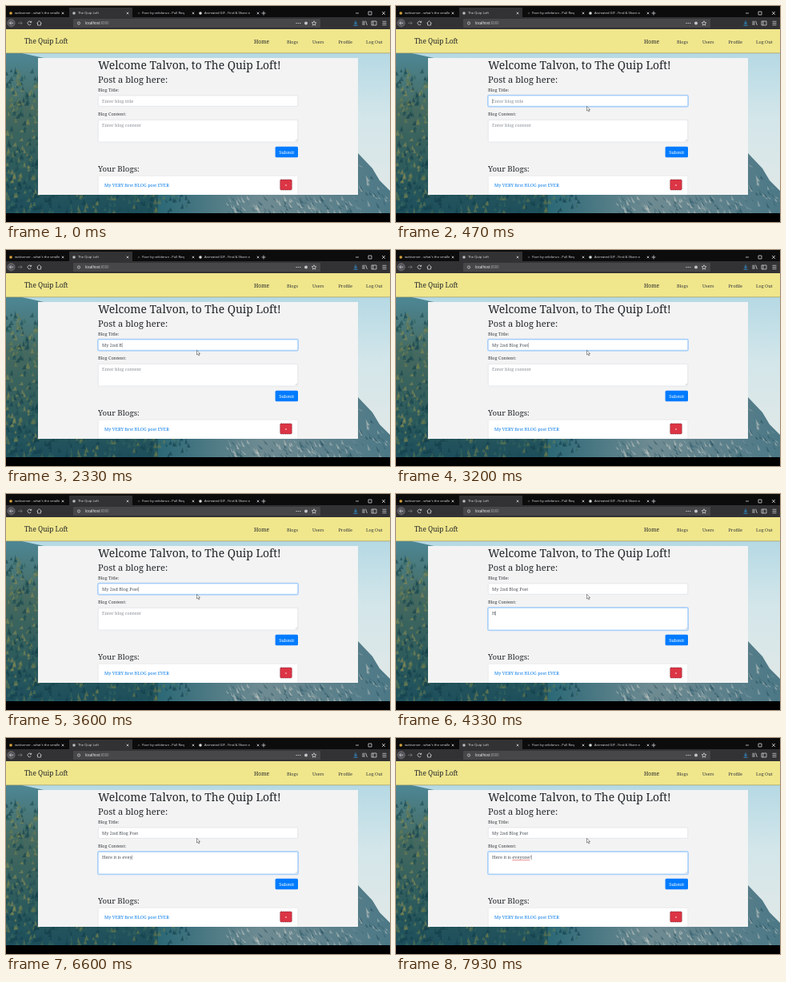
Recreate the animation shown at these times as an HTML page. Size 480 by 270 pixels, loop 8 s.

```html
<!DOCTYPE html>
<html lang="en">
<head>
<meta charset="utf-8">
<title>Blog form</title>
<style>
  html, body { margin: 0; width: 100%; height: 100%; overflow: hidden; background: #000; }
  svg { display: block; width: 100vw; height: 100vh; }
  text { font-family: "Noto Serif", serif; font-size: 5.55px; fill: #33383c; white-space: pre; }
  .chrome text { font-family: "Open Sans", sans-serif; font-size: 4.1px; fill: #e4e4e8; }
  .icon { fill: none; stroke: #d0d0d4; stroke-width: .8; }
  .heading { fill: #212529; }
  .value { fill: #495057; }
  .hint { fill: #868e95; }
  .caret { fill: #555; }
  .field { fill: #fff; stroke: #ced4da; stroke-width: .5; }
  .field.focus { stroke: #80bdff; stroke-width: .6; }
  .ring { fill: none; stroke: #007bff; stroke-opacity: .25; stroke-width: 1.3; }
</style>
</head>
<body>
<svg viewBox="0 0 480 270" preserveAspectRatio="none">
  <defs>
    <linearGradient id="sky" x1="0" y1="0" x2="0" y2="1">
      <stop offset="0" stop-color="#b5d9e4"/>
      <stop offset=".4" stop-color="#d3e6ea"/>
      <stop offset="1" stop-color="#e3e8e6"/>
    </linearGradient>
    <linearGradient id="forest" x1="0" y1="0" x2="0" y2="1">
      <stop offset="0" stop-color="#4d8795"/>
      <stop offset=".35" stop-color="#45695f"/>
      <stop offset=".75" stop-color="#2c5a5c"/>
      <stop offset="1" stop-color="#1d4f5c"/>
    </linearGradient>
    <linearGradient id="rock" x1="0" y1="0" x2="1" y2="0">
      <stop offset="0" stop-color="#2b6876"/>
      <stop offset=".45" stop-color="#6f8b92"/>
      <stop offset="1" stop-color="#4c7886"/>
    </linearGradient>
  </defs>

  <!-- mountain backdrop -->
  <rect y="59" width="480" height="200" fill="url(#sky)"/>
  <path d="M0 59H20L52 66L110 150L240 236L300 259H0Z" fill="url(#forest)"/>
  <path d="M190 259V236L400 170L440 184L458 203L467 218L480 231V259Z" fill="url(#rock)"/>
  <g id="trees"></g>
  <g id="crags"></g>

  <!-- browser window -->
  <g class="chrome">
    <rect width="480" height="15" fill="#0c0c0d"/>
    <rect y="14" width="480" height="15" fill="#323234"/>
    <rect x="79" y="2" width="79" height="13" fill="#323234"/>
    <circle cx="6" cy="9" r="1.800" fill="#d9a43b"/>
    <circle cx="85" cy="9" r="1.800" fill="#b9bcc0"/>
    <circle cx="166" cy="9" r="1.300" fill="#38383c"/>
    <circle cx="243" cy="9" r="1.800" fill="#d8dddb"/>
    <text x="11" y="10.300">webserver - what's the smalle</text>
    <text x="90" y="10.300">The Quip Loft</text>
    <text x="170" y="10.300">Fixer by velidorun - Pull Req</text>
    <text x="248" y="10.300">Animated GIF - Find &amp; Share o</text>
    <g id="closers" class="icon"></g>
    <path class="icon" d="M319.500 9H324.500M322 6.500V11.500M437 9H441M453 7H457V11H453ZM470 7L474 11M474 7L470 11"/>

    <rect x="84" y="16" width="309" height="11" rx="1" fill="#474749"/>
    <circle cx="6.500" cy="21.300" r="4.700" fill="#55555a" stroke="#85858a" stroke-width=".5"/>
    <path class="icon" d="M9 21.300H4.500M6.500 19.200L4.400 21.300L6.500 23.400"/>
    <path class="icon" d="M15 21.300H20M18 19.200L20.100 21.300L18 23.400" opacity=".45"/>
    <path class="icon" d="M31.300 20.200A2.300 2.300 0 1 0 31.300 22.600M31.700 18.700V20.500H29.800"/>
    <path class="icon" d="M38.500 21.500L41.500 18.700L44.500 21.500M39.500 21V24H43.500V21"/>
    <circle class="icon" cx="91" cy="21.500" r="1.600"/>
    <text x="99" y="23" style="fill:#fff;font-size:4.400px">localhost<tspan fill="#a5a5aa">:8080</tspan></text>
    <path d="M362.500 21.500H368.500" stroke="#d0d0d4" stroke-width="1.200" stroke-dasharray="1.200 1.100"/>
    <circle cx="375" cy="21.500" r="2" fill="#c5c5ca"/>
    <path class="icon" d="M385 18.700L385.800 20.600L387.900 20.800L386.300 22.100L386.800 24.200L385 23.100L383.200 24.200L383.700 22.100L382.100 20.800L384.200 20.600Z"/>
    <path class="icon" style="stroke:#32a2ee" d="M437 18.500V22.500M435.200 20.800L437 22.600L438.800 20.800M434.500 24.200H439.500"/>
    <path class="icon" d="M446 18.700V24M447.800 18.700V24M449.600 18.700L451.400 24M457 19H463V24H457ZM459 19V24M470.500 19.300H475.500M470.500 21.500H475.500M470.500 23.700H475.500"/>
  </g>

  <!-- navigation -->
  <rect y="29" width="480" height="30" fill="#f0e68c"/>
  <rect y="58.600" width="480" height=".6" fill="#8b8b67"/>
  <text class="heading" x="23" y="47" style="font-size:8.350px">The Quip Loft</text>
  <text class="heading" x="310" y="47" style="font-size:6.700px">Home</text>
  <text x="351" y="47">Blogs</text>
  <text x="383" y="47">Users</text>
  <text x="415.500" y="47">Profile</text>
  <text x="450" y="47">Log Out</text>

  <!-- page -->
  <rect x="40" y="65" width="400" height="171" fill="#f3f3f3"/>
  <text class="heading" x="115" y="79" style="font-size:13.900px">Welcome Talvon, to The Quip Loft!</text>
  <text class="heading" x="115" y="95.500" style="font-size:11.150px">Post a blog here:</text>
  <text x="115" y="107">Blog Title:</text>
  <text x="115" y="137.300">Blog Content:</text>

  <g id="title">
    <rect class="ring" x="114.600" y="111.300" width="250.800" height="14.700" rx="1.800"/>
    <rect class="field" x="115.250" y="112" width="249.500" height="13.300" rx="1.300"/>
    <text class="hint" x="120" y="121">Enter blog title</text>
    <text class="value" x="120" y="121"></text>
    <rect class="caret" y="116" width=".4" height="6"/>
  </g>
  <g id="content">
    <rect class="ring" x="114.600" y="141.700" width="250.800" height="29" rx="1.800"/>
    <rect class="field" x="115.250" y="142.400" width="249.500" height="27.600" rx="1.300"/>
    <path d="M361.500 169L364 166.500M363 169L364 168" stroke="#999" stroke-width=".4"/>
    <text class="hint" x="120" y="151.300">Enter blog content</text>
    <text class="value" x="120" y="151.300"></text>
    <rect class="caret" y="146.300" width=".4" height="6"/>
  </g>
  <path id="squiggle" fill="none" stroke="#e0303c" stroke-width=".6"/>

  <rect x="336.600" y="175.700" width="28.400" height="13.600" rx="1.500" fill="#007bff"/>
  <text x="350.800" y="184.600" text-anchor="middle" style="fill:#fff">Submit</text>
  <text class="heading" x="115" y="207" style="font-size:9.750px">Your Blogs:</text>
  <path d="M115.250 236V213.500Q115.250 212.200 116.500 212.200H363.500Q364.750 212.200 364.750 213.500V236" fill="#fff" stroke="#dedede" stroke-width=".5"/>
  <text x="123" y="226" style="fill:#0078e7">My VERY first BLOG post EVER</text>
  <rect x="342.700" y="217" width="14.600" height="13" rx="1.300" fill="#dc3545" stroke="#5d2028" stroke-width=".6" stroke-dasharray="1 .6"/>
  <text x="350" y="225" text-anchor="middle" style="fill:#fff;font-size:4px">x</text>
  <rect y="259" width="480" height="11" fill="#000"/>

  <path id="arrow" d="M238.500 125.300V131L239.900 129.800L240.900 132L241.900 131.500L240.900 129.500H242.600Z" fill="#fff" stroke="#222" stroke-width=".45"/>
  <path id="beam" d="M237.700 123.200H240.300M239 123.200V129M237.700 129H240.300" fill="none" stroke="#222" stroke-width=".6"/>
</svg>
<script>
const LOOP = 8000, BLINK = 530;
const $ = selector => document.querySelector(selector);
const show = (node, visible) => { node.style.display = visible ? '' : 'none'; };
const steps = (count, start, gap) => Array.from({ length: count }, (_, i) => start + i * gap);

$('#closers').innerHTML = [71, 152, 234, 315].map(x =>
  `<path d="M${x - 1.3} 7.700l2.600 2.600m0 -2.600l-2.600 2.600"/>`).join('');

let seed = 11;
const random = (low, high) => {
  seed = seed * 16807 % 2147483647;
  return low + (high - low) * seed / 2147483647;
};
const scatter = (count, colors, outline) => Array.from({ length: count }, () =>
  `<path fill="${colors[Math.floor(random(0, colors.length))]}" opacity=".6" d="${outline()}"/>`).join('');

const treeColors = ['#123d4a', '#1d4b54', '#35655f', '#6b7b4c', '#868a55'];
const tree = (x, y) => `M${x} ${y}l${random(1, 3)} ${random(4, 8)}h${-random(3, 6)}z`;
$('#trees').innerHTML =
  scatter(230, treeColors, () => tree(random(0, 42), random(76, 250))) +
  scatter(130, treeColors.slice(0, 4), () => tree(random(0, 230), random(230, 255)));

// Crags lean along the ridge that falls to the right.
$('#crags').innerHTML = scatter(150, ['#244f5e', '#3c6674', '#a9b6b6', '#c3c6c1'], () => {
  const x = random(270, 478);
  const y = random(Math.max(236, x > 440 ? 190 + (x - 440) * 1.2 : 236) - (x > 440 ? 40 - (x - 440) : 0), 256);
  const ridge = x > 440 ? 186 + (x - 440) * 1.2 : 230;
  return `M${x} ${Math.max(y, ridge)}l${random(3, 7)} ${random(4, 9)}l${-random(2, 4)} ${-random(0, 2)}z`;
});

const makeField = (id, message, focusAt, blurAt, keys) => {
  const part = name => $(`#${id} .${name}`);
  return { message, focusAt, blurAt, keys, ring: part('ring'), box: part('field'),
           hint: part('hint'), value: part('value'), caret: part('caret') };
};

const title = makeField('title', 'My 2nd Blog Post', 200, 3800, steps(16, 1670, 94));
const content = makeField('content', 'Here it is eveyone!', 3800, LOOP,
  [...steps(15, 4270, 160), 6730, 7070, 7200, 7450]);

function drawField(field, t) {
  const { message, focusAt, blurAt, keys, value, caret } = field;
  const typed = keys.filter(time => time <= t).length;
  const focused = t >= focusAt && t < blurAt;
  const lastInput = typed ? keys[typed - 1] : focusAt;
  value.textContent = message.slice(0, typed);
  show(field.hint, !typed);
  show(field.ring, focused);
  field.box.classList.toggle('focus', focused);
  show(caret, focused && (t - lastInput) % (2 * BLINK) < BLINK);
  caret.setAttribute('x', 120 + (typed ? value.getComputedTextLength() : 0));
}

function drawSquiggle(t) {
  const visible = t >= 7450;
  show($('#squiggle'), visible);
  if (!visible) return;
  const start = 120 + content.value.getSubStringLength(0, 11);
  const waves = Math.round(content.value.getSubStringLength(11, 7) / 2);
  $('#squiggle').setAttribute('d', `M${start} 153` + 'l1 -.7l1 .7'.repeat(waves));
}

function frame(now) {
  const t = now % LOOP;
  drawField(title, t);
  drawField(content, t);
  drawSquiggle(t);
  const overField = t >= 900 && t < 1730;
  show($('#beam'), overField);
  show($('#arrow'), t >= 200 && !overField);
  requestAnimationFrame(frame);
}
requestAnimationFrame(frame);
</script>
</body>
</html>
```
